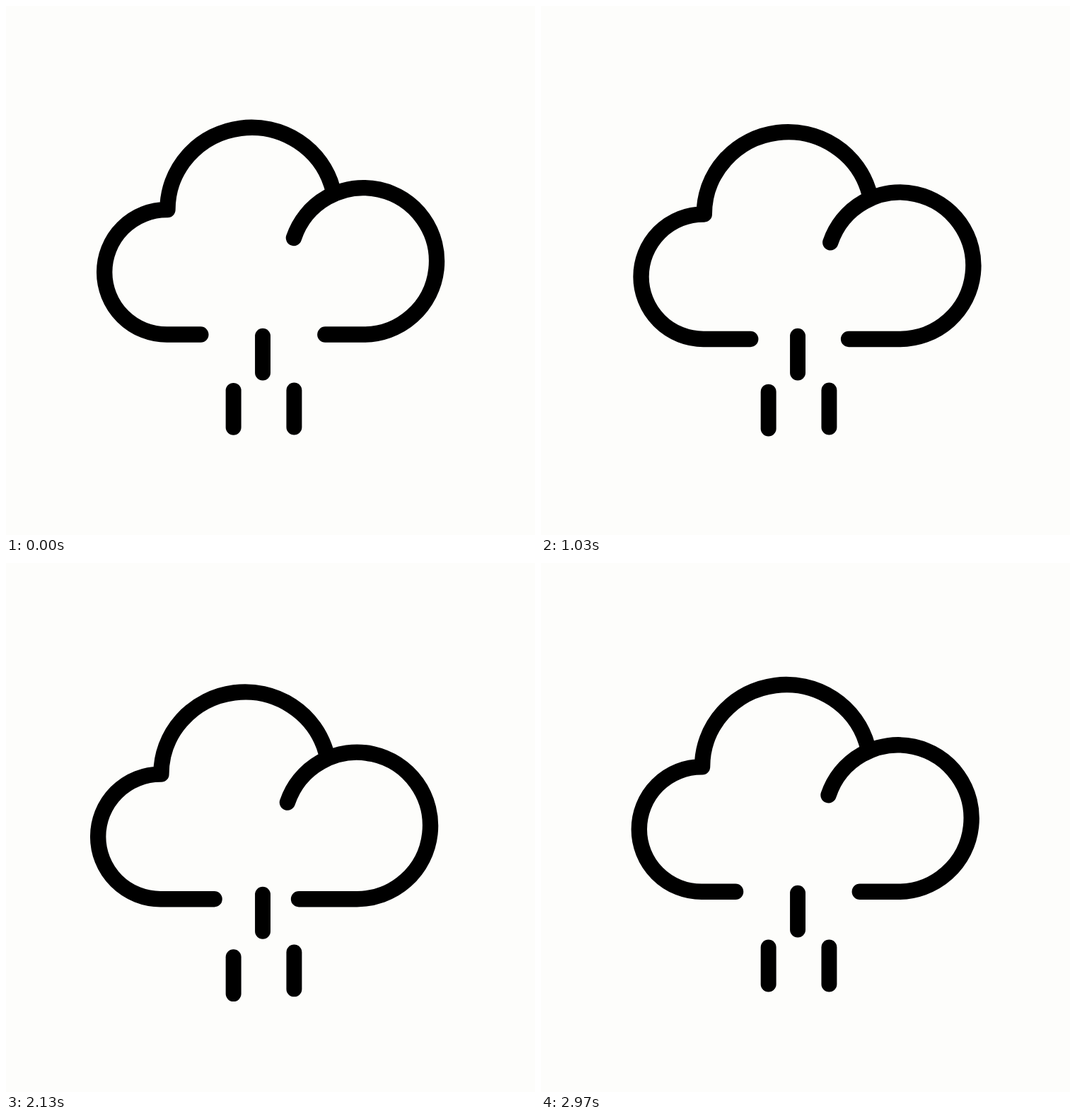
These frames come from a looping animation (748 px wide and 748 px high, 3.01 s). An HTML page:

```html
<!DOCTYPE html>
<html lang="en">
<head>
<meta charset="utf-8">
<title>Rain cloud</title>
<style>
  html, body { margin: 0; width: 100%; height: 100%; overflow: hidden; background: #fdfdfb; }
  svg { display: block; width: 100vw; height: 100vh; }
  path { fill: none; stroke: #000; stroke-width: 22.5; stroke-linecap: round; stroke-linejoin: round; }
  .drop { stroke-width: 22; }
</style>
</head>
<body>
<svg viewBox="0 0 750 750">
  <g id="cloud">
    <path id="left"/>
    <path id="right"/>
  </g>
  <path class="drop"/>
  <path class="drop"/>
  <path class="drop"/>
</svg>
<script>
const LOOP = 3010;
const FRAMES = 90;
const DROP_LENGTH = 52;
const DROP_CYCLE = 1000;
const DROP_TRAVEL = 38.5;
const LEAD = 20;

const drops = [
  { x: 322.5, y: 545, delay: 0 },
  { x: 408.5, y: 545, delay: 50 },
  { x: 364, y: 468, delay: 100 }
];
const dropPaths = document.querySelectorAll(".drop");
const cloud = document.getElementById("cloud");
const left = document.getElementById("left");
const right = document.getElementById("right");

const ramp = (t, from, to) => Math.min(1, Math.max(0, (t - from) / (to - from)));
const smooth = u => u * u * (3 - 2 * u);
const wave = (t, period, peak) => Math.cos(2 * Math.PI * (t - peak) / period);

// The cloud swings round a loop; the half-period waves flatten its turns.
function drawCloud(time) {
  const x = -2 + 6.5 * wave(time, 3000, 630) - 0.5 * wave(time, 1500, 630);
  const y = 5.6 - 5.9 * wave(time, 3000, 260) + 0.75 * wave(time, 1500, 760);
  cloud.setAttribute("transform", `translate(${x} ${y})`);

  const t = time % 1500;
  const reach = 29.3 * (smooth(ramp(t, 0, 710)) - smooth(ramp(t, 710, 1500)));
  left.setAttribute("d",
    `M${276 + reach} 466H228A88.5 88.5 0 0 1 228 289H229A119 116.5 0 0 1 463 259`);
  right.setAttribute("d",
    `M408 329A104 104 0 1 1 506 466H${452.5 - reach}`);
}

// A drop falls while its top is wiped away, regrows from the top, then returns.
function drawDrop(path, { x, y, delay }, time) {
  const t = (time - delay + LEAD + DROP_CYCLE) % DROP_CYCLE - LEAD;
  const fall = smooth(ramp(t, -LEAD, 360)) - ramp(t, 450, 835) ** 2.6;
  const top = y + DROP_TRAVEL * fall;
  const wiping = t < 304;
  const start = wiping ? ramp(t, 148, 304) : 0;
  const end = wiping ? 1 : ramp(t, 304, 462);
  path.setAttribute("d", end - start > 0.01
    ? `M${x} ${top + start * DROP_LENGTH}V${top + end * DROP_LENGTH}` : "");
}

// 30 pictures a second, on a clock of 10 ms.
function tick() {
  const clock = Math.floor((performance.now() % LOOP) / 10);
  const step = Math.min(FRAMES - 1, Math.floor((clock + 0.5) * 0.3));
  const time = step * 100 / 3;
  drawCloud(time);
  dropPaths.forEach((path, i) => drawDrop(path, drops[i], time));
  requestAnimationFrame(tick);
}
tick();
</script>
</body>
</html>
```
